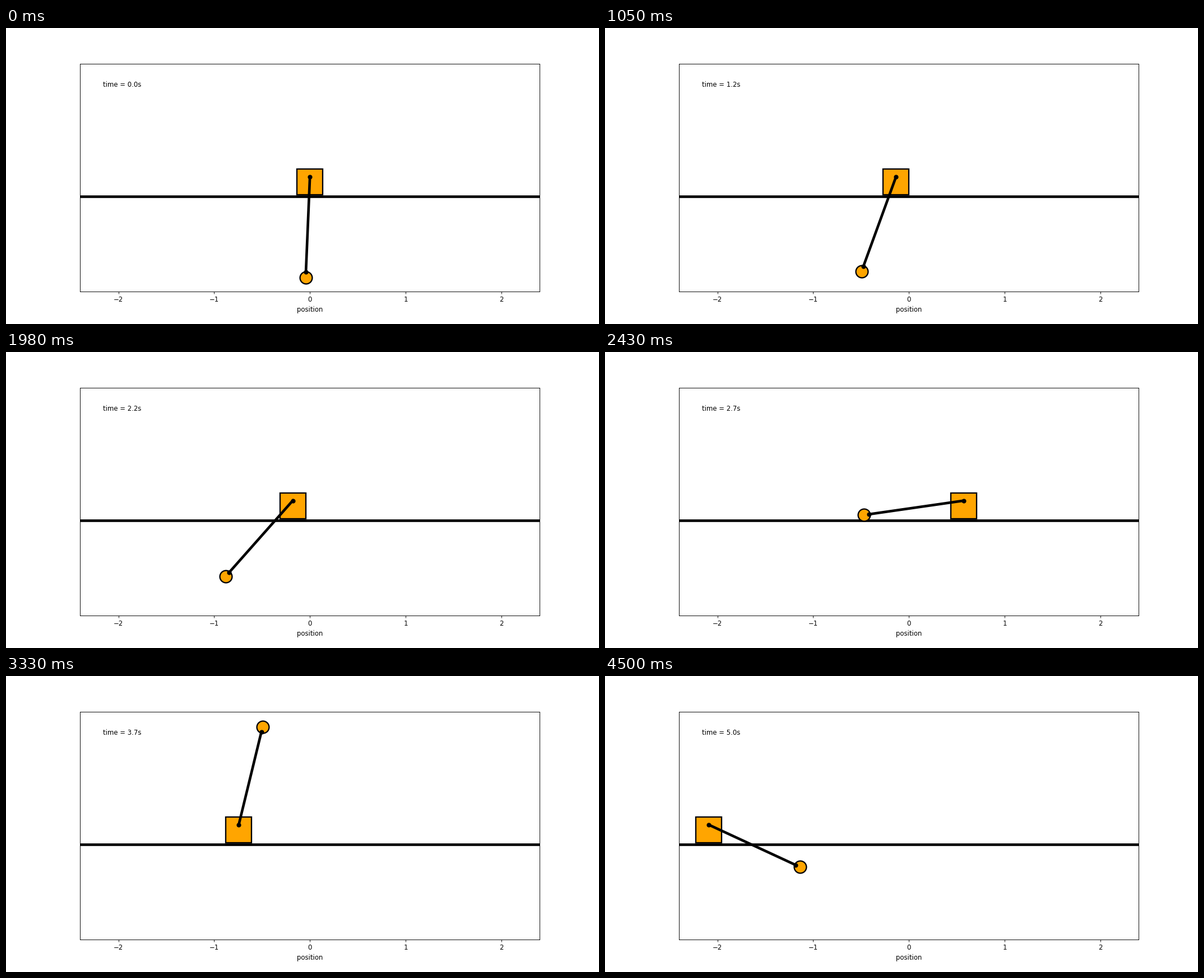
Animation of 1058x529 px, one loop 4530 ms. Source, as a matplotlib script:

```python
import math

import matplotlib.pyplot as plt
from matplotlib.animation import FuncAnimation

FRAMES, INTERVAL, FPS = 151, 30, 30
DPI = 84
PIVOT_Y, CART_Y, POLE, BOB = 0.206, 0.149, 1.0, 1.055

# Turning points: (step, value[, skew]); a skew below 1 hurries the start
# of the swing towards that point, above 1 it holds the start back.
CART = [(0, 0), (28, -0.15), (38, -0.13), (60, -0.446, 1.2), (80, 0.59, 0.9),
        (100, -0.25, 0.8), (118, -1.31, 1.5), (132, -0.493),
        (150, -2.093, 0.66)]
ANGLE = [(0, -0.042), (11, -0.115), (25, 0.285), (38, -0.44), (51, 0.67),
         (78.5, -1.77), (107, 2.957, 0.72), (131.5, -1.49, 1.465),
         (146.5, 1.43), (160, -0.44)]


def swing(turns, step):
    """Half a cosine wave from each turning point to the next."""
    for (t0, v0, *_), (t1, v1, *skew) in zip(turns, turns[1:]):
        if step <= t1:
            u = ((step - t0) / (t1 - t0)) ** (skew[0] if skew else 1)
            return v0 + (v1 - v0) * (1 - math.cos(math.pi * u)) / 2
    return turns[-1][1]


fig = plt.figure(figsize=(1058 / DPI, 529 / DPI), dpi=DPI)
ax = fig.add_axes([0.125, 0.11, 0.775, 0.7685])
ax.set_xlim(-2.4, 2.4)
ax.set_ylim(-0.995, 1.385)
ax.set_xticks(range(-2, 3))
ax.set_yticks([])
ax.set_xlabel("position")

ax.axhline(0, color="black", lw=4, zorder=2)
filled = dict(ls="", mfc="orange", mec="black", mew=2, zorder=3)
cart, = ax.plot([], [], marker="s", ms=39, **filled)
bob, = ax.plot([], [], marker="o", ms=18.7, **filled)
pole, = ax.plot([], [], "o-", color="black", lw=4, zorder=4)
label = ax.text(0.05, 0.9, "", transform=ax.transAxes)


def update(i):
    x, angle = swing(CART, i), swing(ANGLE, i)
    sin, cos = math.sin(angle), math.cos(angle)
    cart.set_data([x], [CART_Y])
    pole.set_data([x, x + POLE * sin], [PIVOT_Y, PIVOT_Y - POLE * cos])
    bob.set_data([x + BOB * sin], [PIVOT_Y - BOB * cos])
    label.set_text(f"time = {i / FPS:.1f}s")
    return cart, bob, pole, label


anim = FuncAnimation(fig, update, frames=FRAMES, interval=INTERVAL,
                     repeat=True, repeat_delay=0, blit=False)
plt.show()
```
